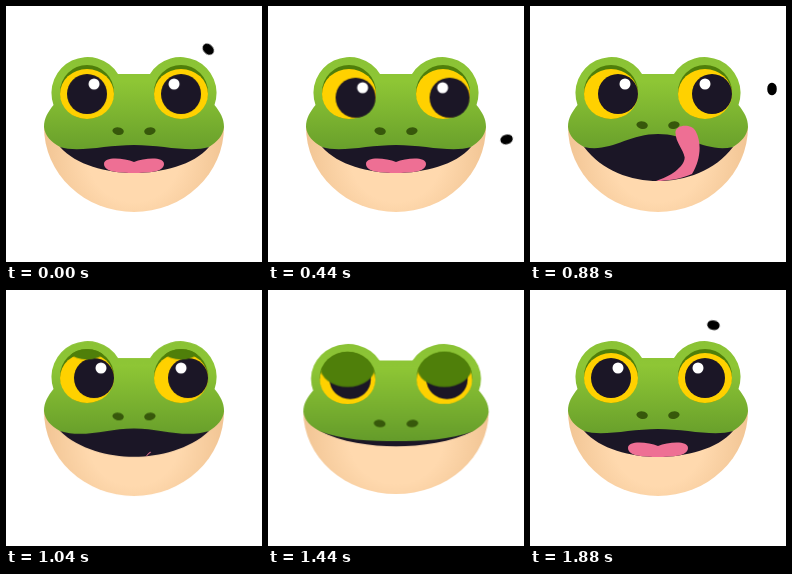
These frames come from a looping animation (256 px wide and 256 px high, 1920 ms). An HTML page without scripts:

```html
<!DOCTYPE html>
<html lang="en">
<head>
<meta charset="utf-8">
<title>Frog and fly</title>
<style>
html, body { margin: 0; width: 100%; height: 100%; overflow: hidden; background: #fff; }
svg { display: block; width: 100vw; height: 100vh; }
.head, .nose, .pupil, .lid, .mouth, .rest, .lick, .fly { animation: 1920ms linear infinite; }
.head { transform-origin: 128px 128px; animation-name: squash; }
.nose { fill: #37580b; animation-name: sniff; }
.pupil { animation-name: look; }
.lid { animation-name: blink; }
.mouth { animation-name: chew; }
.rest { animation-name: tuck; }
.lick { animation-name: lick; }
.fly { animation-name: buzz; }
.dark { fill: #1b1626; }
.skin { fill: #4f7f0a; }
.pink { fill: #ee6f94; }

@keyframes squash {
  0%, 54.17% { transform: none; }
  58.33% { transform: translateY(.7px) scale(1.033, .962); }
  60.42% { transform: translateY(1px) scale(1.044, .949); }
  66.67% { transform: translateY(1px) scale(1.065, .93); }
  72.92% { transform: translateY(1px) scale(1.05, .945); }
  77.08% { transform: scale(1.01, .99); }
  81.25% { transform: translateY(-1px) scale(.976, 1.032); }
  83.33% { transform: translateY(-1px) scale(.972, 1.038); }
  91.67%, 100% { transform: none; }
}
@keyframes sniff {
  0%, 39.58% { transform: none; }
  45.83%, 50% { transform: translateY(-6px); }
  58.33% { transform: translateY(8.5px); }
  60.42%, 72.92% { transform: translateY(10.4px); }
  81.25%, 83.33% { transform: translateY(1px); }
  91.67%, 100% { transform: none; }
}
@keyframes look {
  0% { transform: none; }
  12.5% { transform: translate(5px, 3.5px); }
  20.83% { transform: translate(6.5px, 4.5px); }
  33.33%, 68% { transform: translate(7px, 0); }
  79%, 100% { transform: none; }
}
@keyframes blink {
  0%, 52.08% { transform: translateY(-44px); }
  60.42%, 72.92% { transform: none; }
  86.8%, 100% { transform: translateY(-44px); }
}
@keyframes chew {
  0%, 39.58%, 85%, 100% { d: path("M54 141C72 147 100 139 128 139C156 139 184 147 203 141C188 159 155 167 128 167C101 167 70 159 54 141Z"); }
  45.83%, 51% { d: path("M54 141C80 147 98 128 128 128C158 128 176 147 203 141C185 165 155 175 128 175C101 175 72 165 54 141Z"); }
  59%, 72.92% { d: path("M54 141C75 151 105 154 128 154C151 154 181 151 203 141C181 151 151 154.6 128 154.6C105 154.6 75 151 54 141Z"); }
}
@keyframes tuck {
  0%, 39.58% { transform: none; }
  44%, 72.92% { transform: translateY(28px); }
  84.2%, 100% { transform: none; }
}
@keyframes lick {
  0%, 40.5%, 54.5%, 100% { d: path("M140 166C140 166 140 166 140 166C140 166 140 166 140 166C140 166 140 166 140 166C140 166 140 166 140 166C140 166 140 166 140 166Z"); }
  45.83% { d: path("M126 175C140 171 155 161 154 152C152 144 144 138 143.5 127C144.500 119 160 118.500 164 126C171 138 170 155 162 168C150 173 138 175 126 175Z"); }
  48.5% { d: path("M126 175C150 165 160 135 185 112C205 96 225 84 236 78C242 74 250 82 245 88C225 104 190 130 161 168C150 173 138 175 126 175Z"); }
}
@keyframes buzz {
  0% { transform: translate(202px, 43px) rotate(45deg); }
  2.08% { transform: translate(211px, 52px) rotate(58deg); }
  4.17% { transform: translate(217px, 63px) rotate(70deg); }
  8.33% { transform: translate(221px, 86px) rotate(88deg); }
  12.5% { transform: translate(221px, 107px) rotate(90deg); }
  16.67% { transform: translate(226px, 126px) rotate(65deg); }
  20.83% { transform: translate(234px, 136px) rotate(20deg); }
  25% { transform: translate(243px, 131px) rotate(-50deg); }
  29.17% { transform: translate(244px, 117px) rotate(-85deg); }
  33.33% { transform: translate(243px, 99px) rotate(-90deg); }
  39.58% { transform: translate(242px, 88px) rotate(-90deg); }
  45.83%, 48.5% { transform: translate(242px, 83px) rotate(-90deg); opacity: 1; }
  54% { transform: translate(146px, 158px) rotate(-90deg); opacity: 1; }
  54.1% { transform: translate(128px, -12px); opacity: 0; }
  87% { transform: translate(128px, -12px) rotate(40deg); opacity: 0; }
  87.1% { transform: translate(128px, -10px) rotate(40deg); opacity: 1; }
  91.67% { transform: translate(142px, 8px) rotate(45deg); }
  93.75% { transform: translate(152px, 18px) rotate(40deg); }
  95.83% { transform: translate(166px, 28px) rotate(28deg); }
  97.92% { transform: translate(183px, 35px) rotate(10deg); }
  100% { transform: translate(202px, 43px) rotate(45deg); }
}
</style>
</head>
<body>
<svg viewBox="0 0 256 256">
  <defs>
    <linearGradient id="green" gradientUnits="userSpaceOnUse" x1="0" y1="50" x2="0" y2="152">
      <stop offset="0" stop-color="#8ac235"/>
      <stop offset=".25" stop-color="#8ec635"/>
      <stop offset="1" stop-color="#649b2a"/>
    </linearGradient>
    <radialGradient id="chin" gradientUnits="userSpaceOnUse" cx="128" cy="150" r="92">
      <stop offset=".5" stop-color="#ffd9ae"/>
      <stop offset="1" stop-color="#f1c493"/>
    </radialGradient>
    <clipPath id="socket"><ellipse cy="-2" rx="27" ry="27"/></clipPath>
    <clipPath id="lips"><path class="mouth" d="M54 141"/></clipPath>
    <g id="ball">
      <ellipse class="skin" cy="-2" rx="27" ry="27"/>
      <ellipse fill="#ffd100" rx="27" ry="25"/>
    </g>
  </defs>

  <g class="head">
    <path fill="url(#chin)" d="M38 121A90 85 0 0 0 218 121Z"/>
    <path fill="url(#green)" d="M38 121C38 112 42 106 47.5 99A36 36 0 0 1 112 68H144A36 36 0 0 1 208.5 99C214 106 218 112 218 121C217 130 211 136 203 141C181 151 151 154 128 154C105 154 75 151 54 141C45 136 39 130 38 121Z"/>

    <g transform="translate(81 88)">
      <use href="#ball"/>
      <g class="pupil"><circle class="dark" r="20"/><circle cx="7" cy="-10" r="5.5" fill="#fff"/></g>
      <g clip-path="url(#socket)"><ellipse class="lid skin" cy="-7.4" rx="27" ry="21.6"/></g>
    </g>
    <g transform="translate(175 88)">
      <use href="#ball"/>
      <g class="pupil"><circle class="dark" r="20"/><circle cx="-7" cy="-10" r="5.5" fill="#fff"/></g>
      <g clip-path="url(#socket)"><ellipse class="lid skin" cy="-7.4" rx="27" ry="21.6"/></g>
    </g>

    <path class="mouth dark" d="M54 141"/>
    <g clip-path="url(#lips)">
      <path class="rest pink" d="M128 156C118 152 98 150 98 158C98 166 116 168 128 169C140 168 158 166 158 158C158 150 138 152 128 156Z"/>
    </g>
    <g class="nose">
      <path d="M106.5 124C108 120.5 114 120.5 117 123.5C119 126 117 129 113 129C110 129 106 127 106.5 124Z"/>
      <path d="M149.5 124C148 120.5 142 120.5 139 123.5C137 126 139 129 143 129C146 129 150 127 149.5 124Z"/>
    </g>
    <path class="lick pink" d="M140 166"/>
  </g>

  <ellipse class="fly" rx="6.3" ry="4.8"/>
</svg>
</body>
</html>
```
